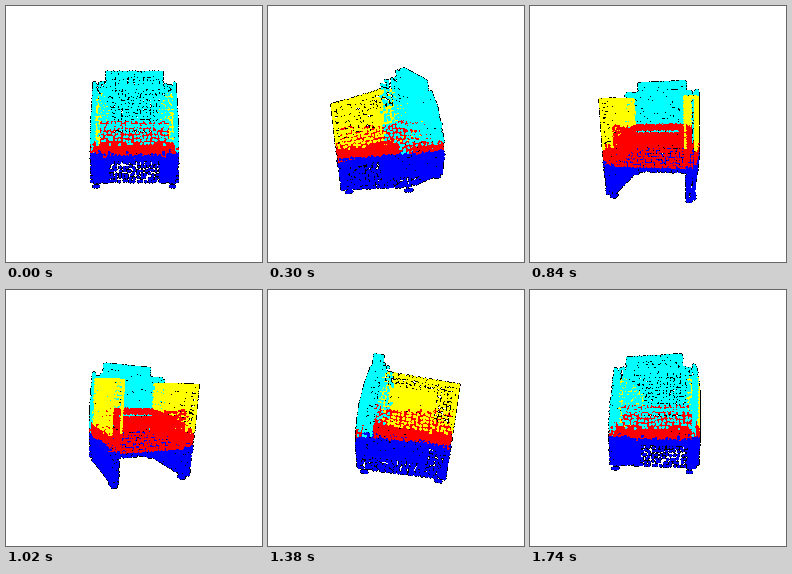
Write a matplotlib script that moves like this. It is 256 by 256 pixels and loops after 1800 ms.

```python
import numpy as np
import matplotlib.pyplot as plt
from matplotlib.animation import FuncAnimation

SIZE, FRAMES, STEP = 256, 30, 60
CENTER, CAMERA = 128, 225        # screen centre and eye distance, in pixels
SCALE = 0.985
PITCH = np.radians(8.5)          # the chair leans forward
DOT, RIM = 1.5, 2.0              # radii of a dot and its black backing

CYAN, YELLOW, RED, BLUE = range(4)
COLORS = np.array([[0, 255, 255], [255, 255, 0], [255, 0, 0], [0, 0, 255]],
                  dtype=np.uint8)

rng = np.random.default_rng(4)
parts = []


def grid(u0, u1, v0, v1, gap):
    """Jittered grid of surface coordinates."""
    nu = max(2, int(round((u1 - u0) / gap)) + 1)
    nv = max(2, int(round((v1 - v0) / gap)) + 1)
    u, v = np.meshgrid(np.linspace(u0, u1, nu), np.linspace(v0, v1, nv))
    jitter = rng.uniform(-0.3, 0.3, (2, u.size)) * gap
    return (np.clip(u.ravel() + jitter[0], u0, u1),
            np.clip(v.ravel() + jitter[1], v0, v1))


def add(x, y, t, color, keep=True):
    """Add points: x across, y up, t towards the back of the chair."""
    x, y, t, color, keep = np.broadcast_arrays(x, y, t, color, keep)
    parts.append(np.column_stack([x, y, t, color])[keep])


def rear(y):
    return 36 - 0.003 * y ** 2


def blue_line(t):
    return -18.5 - 0.05 * t


def build_side(s):
    # outer shell
    t, y = grid(-45, 36, -46, 43, 3.1)
    top = 36 + 7 * np.clip((t - 8) / 10, 0, 1)
    shade = np.where(t < 11 + rng.normal(0, 2, t.size), YELLOW, CYAN)
    low = (y < -8 + rng.normal(0, 1.5, t.size)) & (t < 22)
    shade = np.where(low, RED, shade)
    shade = np.where(y < blue_line(t), BLUE, shade)
    x = 39 - 2.5 * np.clip((t - 15) / 15, 0, 1)
    x = x - 3 * np.clip((-y - 25) / 22, 0, 1)
    add(s * x, y, t, shade, (y <= top) & (t <= rear(y)))

    # inner face, red where it meets the seat
    t, y = grid(-45, 20, -18, 36, 3.4)
    add(s * 31, y, t, np.where(y < 8 - 0.14 * t, RED, YELLOW))
    t, y = grid(-45, 22, -46, -18, 3.3)
    add(s * 32, y, t, BLUE, y < -30 + 0.011 * (t + 12) ** 2)

    # arm top and front edges
    t, x = grid(-45, 16, 31, 39, 3.2)
    add(s * x, 36, t, YELLOW)
    y = np.arange(-4, 36, 2)
    add(s * 31, y, -45, YELLOW)
    add(s * 39, y, -45, YELLOW)
    x, y = grid(32, 38, -46, -20, 2.6)
    add(s * x, y, -45, BLUE)
    x, y = grid(31, 39, -20, -3, 2.6)
    add(s * x, y, -44, RED)

    # feet
    for foot in (-41, 24):
        x, t = grid(32, 35, foot - 2, foot + 2, 2)
        add(s * x, -49.5, t, BLUE)


def build_back():
    x, y = grid(-37, 37, -45, 43, 3.1)
    shade = np.where(y < -14 + rng.normal(0, 1.5, x.size), RED, CYAN)
    shade = np.where(y < -20.5, BLUE, shade)
    corner = np.clip(np.abs(x) - 32, 0, None)
    add(x, y, rear(y) - 0.12 * corner ** 2, shade,
        y < 43 - 0.16 * corner ** 2)

    # cushion facing the seat
    x, y = grid(-31, 31, 4, 43, 2.9)
    add(x, y, 20, CYAN)

    # headrest
    x, y = grid(-25, 25, 41, 53, 3)
    add(x, y, 23, CYAN)
    add(x, y, 30, CYAN)
    x, t = grid(-25, 25, 23, 30, 3)
    add(x, 53, t, CYAN)
    y, t = grid(41, 53, 23, 30, 3)
    add(-25, y, t, CYAN)
    add(25, y, t, CYAN)


def build_seat():
    x, t = grid(-31, 31, -43, 22, 2.6)
    slot = (np.abs(x) < 22) & (t > -13) & (t < 0)
    add(x, 5 + 0.13 * t, t, RED, ~slot)
    x, y = grid(-32, 32, -21, -1, 2.4)
    add(x, y, -43, RED)
    x, y = grid(-32, 32, -25, -21, 2.4)
    add(x, y, -42, BLUE)


for side in (-1, 1):
    build_side(side)
build_back()
build_seat()

x, y, t, part = np.vstack(parts).T
part = part.astype(int)
up = y * np.cos(PITCH) + t * np.sin(PITCH)
back = t * np.cos(PITCH) - y * np.sin(PITCH)

oy, ox = (o.ravel() for o in np.mgrid[-2:3, -2:3])


def render(i):
    a = 2 * np.pi * i / FRAMES
    near = back * np.cos(a) - x * np.sin(a)
    zoom = SCALE * CAMERA / (CAMERA - near)
    px = CENTER + zoom * (x * np.cos(a) + back * np.sin(a))
    py = CENTER - zoom * up

    # far to near, so that closer dots cover the others
    order = np.argsort(near, kind="stable")
    px, py, kind = px[order, None], py[order, None], part[order, None]
    col = np.rint(px).astype(int) + ox
    row = np.rint(py).astype(int) + oy
    dist = np.hypot(col - px, row - py)
    kind = np.broadcast_to(kind, dist.shape)
    rim, dot = dist < RIM, dist < DOT

    # all backings lie beneath all dots
    image = np.full((SIZE, SIZE, 3), 255, dtype=np.uint8)
    image[row[rim], col[rim]] = 0
    image[row[dot], col[dot]] = COLORS[kind[dot]]
    return image


fig = plt.figure(figsize=(2.56, 2.56), dpi=100, facecolor="white")
ax = fig.add_axes([0, 0, 1, 1])
ax.axis("off")
picture = ax.imshow(render(0), interpolation="nearest", aspect="auto")


def update(i):
    picture.set_data(render(i))
    return [picture]


anim = FuncAnimation(fig, update, frames=FRAMES, interval=STEP,
                     repeat=True, repeat_delay=0, blit=False)
plt.show()
```
